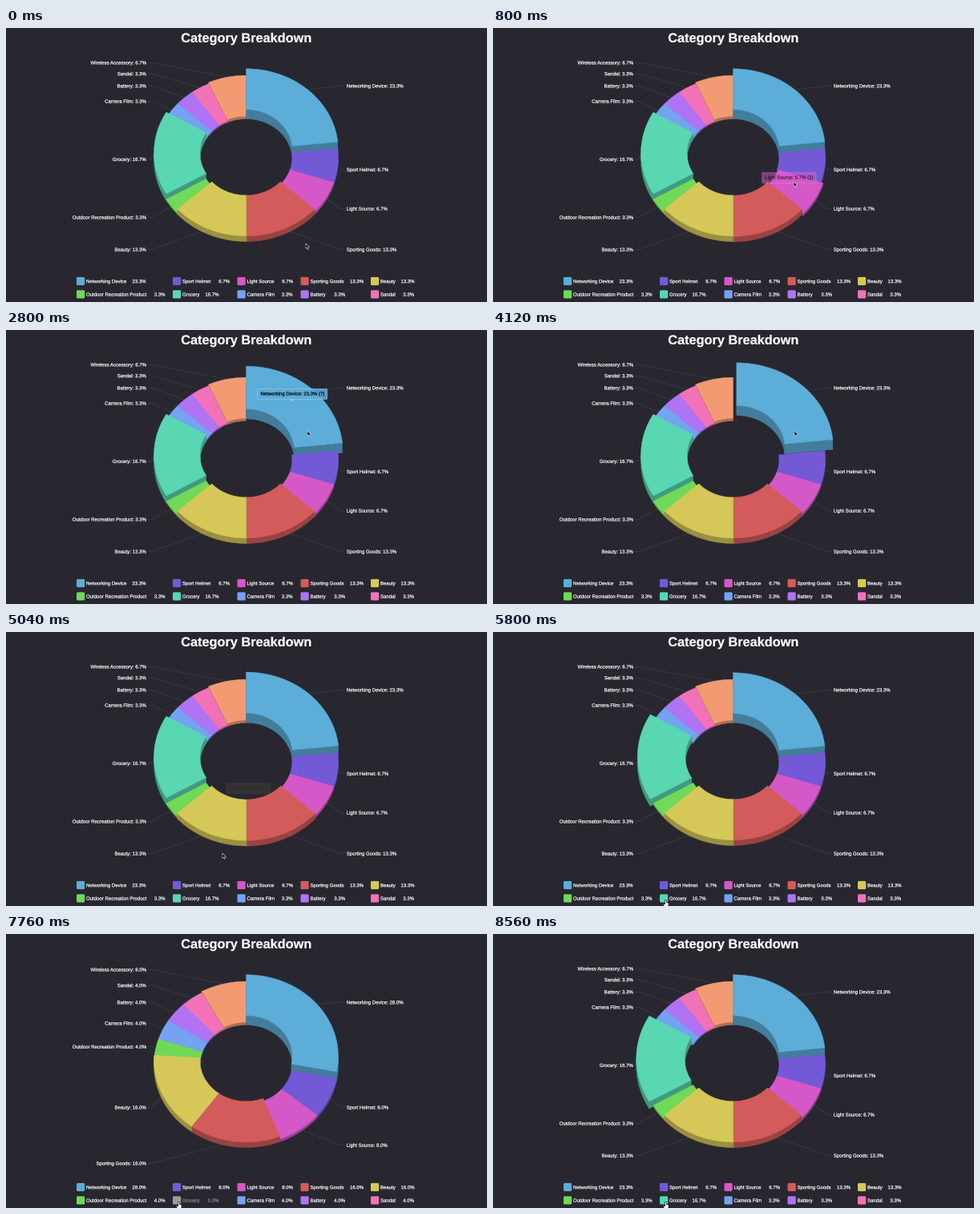
Animation, 600 px wide and 342 px high, one loop 8600 ms. Source, as a matplotlib script:

```python
import numpy as np
import matplotlib.pyplot as plt
from matplotlib.animation import FuncAnimation
from matplotlib.collections import LineCollection, PolyCollection
from matplotlib.colors import to_rgb
from matplotlib.patches import FancyBboxPatch, Polygon
from matplotlib.patheffects import Stroke

plt.rcParams["font.family"] = "Liberation Sans"
plt.rcParams["text.hinting"] = "none"

W, H, DPI = 600, 342, 100
STEP, FRAMES = 40, 215
PX = 72 / DPI                       # points per pixel
CX, CY, RX, RY, HOLE = 299.5, 164.5, 115, 102, 0.5
DEPTH = 1.67                        # extrusion per unit of value
TEXT = 6.04
GREY = "#9b9b9b"

NAMES = ["Networking Device", "Sport Helmet", "Light Source", "Sporting Goods",
         "Beauty", "Outdoor Recreation Product", "Grocery", "Camera Film",
         "Battery", "Sandal", "Wireless Accessory"]
VALUES = np.array([7, 2, 2, 4, 4, 1, 5, 1, 1, 1, 2], float)
COLORS = ["#5cadd8", "#7459d7", "#d558c8", "#d45b5b", "#d6c858", "#70d957",
          "#59d6b2", "#74a3f2", "#b073f4", "#f272ba", "#f29b72"]
LEGEND_X = [88, 208, 288.5, 367.5, 455]
LEGEND_END = [174.5, 279, 358, 446, 509.5, 198.5, 265.5, 357.5, 423, 509]

NET, GROCERY = 0, 6
PULL, PUSH = 2900, 4050             # clicks on the largest slice
HIDE, SHOW = 6060, 7940             # clicks on the legend entry


def cubic_out(t, start, dur):
    u = np.clip((t - start) / dur, 0, 1)
    return 1 - (1 - u) ** 3


def smooth(t, start, end):
    u = np.clip((t - start) / (end - start), 0, 1)
    return u * u * (3 - 2 * u)


def cursor_at(t):
    stops = [(374, 269), (376, 126), (270, 276), (215.5, 334.5)]
    moves = [(400, 1160), (4600, 5040), (5120, 5720)]
    p = np.array(stops[0], float)
    for a, b, span in zip(stops, stops[1:], moves):
        p += (np.array(b) - a) * smooth(t, *span)
    return p


def values_at(t):
    v = VALUES.copy()
    v[GROCERY] *= 1 - cubic_out(t, HIDE, 600) + cubic_out(t, SHOW, 600)
    return v


def angles(v):
    ends = np.cumsum(v) / v.sum() * 360
    return ends - v / v.sum() * 360, ends


def project(r, deg, lift=0.0):
    a = np.radians(deg)
    return np.column_stack([CX + RX * r * np.sin(a),
                            CY - RY * r * np.cos(a) - lift])


def over_legend(p):
    return 207 < p[0] < 266 and p[1] > 326


def slice_under(p, t):
    if over_legend(p):
        return GROCERY
    for i, (a0, a1) in enumerate(zip(*angles(values_at(t)))):
        x = (p[0] - CX) / RX
        y = (CY - VALUES[i] * DEPTH - p[1]) / RY
        if HOLE <= np.hypot(x, y) <= 1 and a0 <= np.degrees(np.arctan2(x, y)) % 360 < a1:
            return i
    return None


def simulate():
    """Hover growth and tooltip (x, y, alpha, slice) for every frame."""
    grow, tip, states = np.zeros(len(NAMES)), None, []
    for n in range(FRAMES):
        t = n * STEP
        p = cursor_at(t)
        hit = slice_under(p, t)
        goal = np.zeros(len(NAMES))
        if hit is not None:
            goal[hit] = 1
        grow = grow + (goal - grow) * 0.2
        shown = hit is not None and not over_legend(p) and not (hit == NET and t >= PULL)
        if shown:
            a0, a1 = angles(values_at(t))
            x, y = project(0.75, np.array([(a0[hit] + a1[hit]) / 2]),
                           VALUES[hit] * DEPTH + 16)[0]
            if tip is None:
                tip = (x, y, 0, hit)
            tip = (tip[0] + (x - tip[0]) * 0.5, tip[1] + (y - tip[1]) * 0.5,
                   tip[2] + (1 - tip[2]) * 0.2, hit)
        elif tip is not None:
            tip = (tip[0], tip[1], tip[2] * 0.55, tip[3])
        states.append((grow, tip))
    return states


def solid(a0, a1, depth, scale, shift):
    """Polygons of one extruded slice as (points, is_top)."""
    def strip(lo, hi):
        return np.linspace(lo, hi, max(2, int((hi - lo) / 2) + 2))

    def wall(r, deg):
        top = project(r * scale, deg, depth * scale)
        return np.vstack([top, project(r * scale, deg)[::-1]])

    def side(deg):
        a = np.array([deg, deg])
        r = np.array([HOLE, 1]) * scale
        return np.vstack([project(r, a, depth * scale), project(r, a)[::-1]])

    parts = []
    for r, lo, hi in ((HOLE, 0, 90), (HOLE, 270, 360), (1, 90, 270)):
        lo, hi = max(lo, a0), min(hi, a1)
        if hi > lo:
            parts.append((wall(r, strip(lo, hi)), False))
    if a0 >= 180:
        parts.append((side(a0), False))
    if a1 <= 180:
        parts.append((side(a1), False))
    deg = strip(a0, a1)
    face = np.vstack([project(scale, deg, depth * scale),
                      project(HOLE * scale, deg[::-1], depth * scale)])
    parts.append((face, True))
    return [(pts + shift, top) for pts, top in parts]


fig = plt.figure(figsize=(W / DPI, H / DPI), dpi=DPI, facecolor="#282730")
ax = fig.add_axes([0, 0, 1, 1])
ax.set_xlim(0, W)
ax.set_ylim(H, 0)
ax.axis("off")


def write(x, y, s="", size=TEXT, **kw):
    # Drawn as outlines, so small text keeps its exact place and weight.
    return ax.text(x, y, s, fontsize=size * PX, color=kw.pop("color", "white"),
                   path_effects=[Stroke(linewidth=0.2 * PX)], **kw)


write(299.5, 17.8, "Category Breakdown", 16.3, weight="bold", ha="center")

pie = PolyCollection([], linewidths=0.4 * PX, zorder=2)
ticks = LineCollection([], linewidths=0.7 * PX, zorder=3)
ax.add_collection(pie, autolim=False)
ax.add_collection(ticks, autolim=False)
labels = [write(0, 0) for _ in NAMES]

markers, keys, shares = [], [], []
for i, name in enumerate(NAMES[:10]):
    x, y = LEGEND_X[i % 5], 316 + 16.4 * (i // 5)
    box = FancyBboxPatch((x + 1.5, y - 3.6), 7.2, 7.2, lw=0, fc=COLORS[i],
                         boxstyle="round,pad=1.5,rounding_size=1.5")
    markers.append(ax.add_patch(box))
    keys.append(write(x + 12, y + 2.2, name))
    shares.append(write(LEGEND_END[i], y + 2.2, ha="right"))

tip_text = write(0, 0, ha="center", va="center", zorder=6,
                 bbox=dict(boxstyle="round,pad=0.64,rounding_size=0.2", lw=0.7 * PX))
tip_arrow = ax.add_patch(Polygon([(0, 0)] * 3, lw=0, zorder=5))

ARROW = 0.88 * np.array([(0, 0), (0, 7.2), (1.7, 5.7), (2.9, 8.3), (4, 7.8),
                         (2.9, 5.3), (5.1, 5.2)])
HAND = np.array([(-0.8, 0), (0.8, 0), (0.9, 3), (3.6, 3.7), (3.6, 6.4), (2.6, 8.2),
                 (-1.7, 8.2), (-3.4, 5), (-2.4, 4.3), (-0.8, 5.4)])
cursor = ax.add_patch(Polygon(ARROW, lw=0.6 * PX, zorder=8))

STATES = simulate()


def draw_pie(t, v, a0, a1, grow):
    mid = (a0 + a1) / 2
    pull = 0.1 * (cubic_out(t, PULL, 400) - cubic_out(t, PUSH, 400))
    verts, colors = [], []
    for i in np.argsort(-np.cos(np.radians(mid))):
        if v[i] < 0.005:
            continue
        a = np.radians(mid[i])
        shift = np.array([RX * np.sin(a), -RY * np.cos(a)]) * (pull if i == NET else 0)
        rgb = np.array(to_rgb(COLORS[i]))
        for pts, top in solid(a0[i], a1[i], VALUES[i] * DEPTH, 1 + 0.05 * grow[i], shift):
            verts.append(pts)
            colors.append(rgb if top else rgb * 0.72)
    pie.set_verts(verts)
    pie.set_facecolor(colors)
    pie.set_edgecolor(colors)


def draw_labels(t, v, a0, a1):
    lines, tints = [], []
    for i, name in enumerate(NAMES):
        mid = (a0[i] + a1[i]) / 2
        right = mid < 180
        y = 163.8 - 123.3 * np.cos(np.radians(mid))
        alpha = 1.0
        if i == GROCERY:
            alpha = 1 - cubic_out(t, HIDE, 250) + cubic_out(t, SHOW, 300)
        labels[i].set(x=424.8 if right else 174.6, y=y + 2.2, alpha=alpha,
                      ha="left" if right else "right",
                      text=f"{name}: {v[i] / v.sum():.1%}")
        start = project(1, np.array([mid]), VALUES[i] * DEPTH)[0]
        bend, end = (417, 422) if right else (182, 177)
        lines.append([start, (bend, y), (end, y)])
        tints.append((1, 1, 1, 0.1 * alpha))
    ticks.set_segments(lines)
    ticks.set_color(tints)


def draw_legend(t, v):
    off = HIDE <= t < SHOW
    for i, share in enumerate(shares):
        share.set_text(f"{v[i] / v.sum():.1%}")
    markers[GROCERY].set_facecolor(GREY if off else COLORS[GROCERY])
    for item in (keys[GROCERY], shares[GROCERY]):
        item.set_color("#8c8c90" if off else "white")


def draw_tip(tip, v):
    on = tip is not None and tip[2] > 0.02
    tip_text.set_visible(on)
    tip_arrow.set_visible(on)
    if not on:
        return
    x, y, alpha, i = tip
    rgb = to_rgb(COLORS[i])
    dark = np.dot(rgb, (0.299, 0.587, 0.114)) > 0.5
    tip_text.set(x=x, y=y, alpha=alpha, color="black" if dark else "white",
                 text=f"{NAMES[i]}: {v[i] / v.sum():.1%} ({VALUES[i]:.0f})")
    tip_text.get_bbox_patch().set(facecolor=(*rgb, 0.9 * alpha),
                                  edgecolor=(1, 1, 1, 0.35 * alpha))
    tip_arrow.set_xy([(x - 2.5, y + 6.5), (x + 2.5, y + 6.5), (x, y + 9.5)])
    tip_arrow.set(facecolor="#a9d6ec" if i == NET else rgb, alpha=0.7 * alpha)


def update(n):
    t = n * STEP
    grow, tip = STATES[n]
    v = values_at(t)
    a0, a1 = angles(v)
    draw_pie(t, v, a0, a1, grow)
    draw_labels(t, v, a0, a1)
    draw_legend(t, v)
    draw_tip(tip, v)
    p = cursor_at(t)
    hand = over_legend(p)
    cursor.set_xy((HAND if hand else ARROW) + p)
    cursor.set(facecolor="white" if hand else "black",
               edgecolor="black" if hand else "#d8d8dc")
    return []


anim = FuncAnimation(fig, update, frames=FRAMES, interval=STEP,
                     init_func=lambda: [], repeat=True, repeat_delay=0, blit=False)
plt.show()
```
